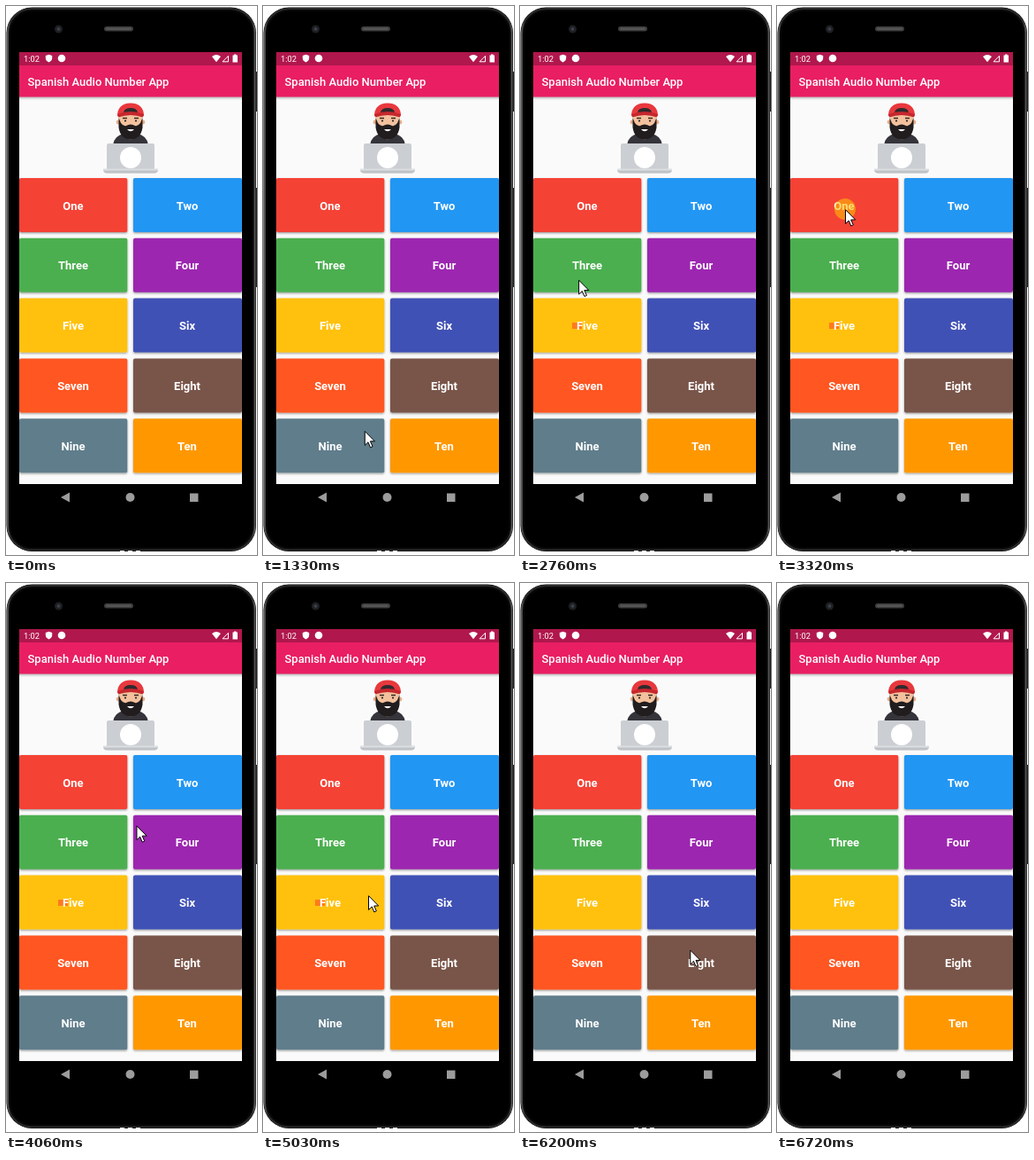
An HTML page that plays this animation: 284 by 619 pixels, repeating every 7.37 s.

```html
<!DOCTYPE html>
<html lang="en">
<head>
<meta charset="utf-8">
<title>Number buttons</title>
<style>
  html, body { margin: 0; width: 100%; height: 100%; overflow: hidden; background: #fff; }
  svg { display: block; width: 284px; height: 619px; font-family: Roboto, sans-serif; }
</style>
</head>
<body>
<svg viewBox="0 0 284 619">
  <defs>
    <linearGradient id="rim" x2="1" y2="0">
      <stop offset="0" stop-color="#555"/><stop offset=".012" stop-color="#2a2a2a"/>
      <stop offset=".988" stop-color="#2a2a2a"/><stop offset="1" stop-color="#555"/>
    </linearGradient>
    <linearGradient id="fall" x2="0" y2="1">
      <stop offset="0" stop-color="#000" stop-opacity=".28"/><stop offset="1" stop-color="#000" stop-opacity="0"/>
    </linearGradient>
    <filter id="lift" x="-5%" y="-10%" width="110%" height="125%">
      <feDropShadow dx="0" dy="1.2" stdDeviation="1" flood-opacity=".4"/>
    </filter>
  </defs>

  <g id="phone">
    <path d="M282 74h2v45h-2zM282 205h2v112h-2z" fill="#222"/>
    <rect x=".5" y="1.5" width="282.5" height="613.5" rx="29" fill="#080808"/>
    <rect x="2" y="3" width="279.5" height="610.5" rx="27.5" fill="none" stroke="url(#rim)" stroke-width="2"/>
    <rect x="5" y="6" width="273.5" height="604.5" rx="25" fill="#000"/>
    <path d="M129 614.5h25" stroke="#ddd" stroke-dasharray="5 4"/>
    <circle cx="59.5" cy="26" r="4.5" fill="#1d1f22"/>
    <circle cx="59.5" cy="26" r="2" fill="#3a3f48"/>
    <rect x="111" y="23" width="33" height="5.5" rx="2.75" fill="#3d3d3d"/>
    <rect x="113" y="24.5" width="29" height="2.5" rx="1.2" fill="#555"/>
  </g>

  <g id="screen">
    <rect x="15" y="52" width="252" height="487" fill="#fafafa"/>
    <rect x="15" y="102" width="252" height="4" fill="url(#fall)"/>
    <rect x="15" y="67" width="252" height="35.5" fill="#e91e63"/>
    <rect x="15" y="52" width="252" height="15" fill="#b0174c"/>
    <text x="20" y="62.7" font-size="9.3" fill="#fff">1:02</text>
    <text x="24.5" y="90" font-size="13" font-weight="500" fill="#fff">Spanish Audio Number App</text>
    <g fill="#fff">
      <path d="M48.5 54.7l3.7 1.4v2.7q0 3-3.7 4.8q-3.7-1.8-3.7-4.8v-2.7z"/>
      <circle cx="63" cy="59" r="4.3"/>
      <path d="M233 57q5-4 10 0l-5 6.2z"/>
      <path d="M256.5 55.5h1.5v-1h2.5v1h1.5v8h-5.500z"/>
    </g>
    <path d="M245 62.8h6.500v-6.500z" fill="none" stroke="#fff"/>
  </g>

  <g id="man">
    <path d="M121 157q1-11 13-13h14q12 2 13 13z" fill="#34343a"/>
    <path d="M135 138h12v10q-6 5-12 0z" fill="#d99d7a"/>
    <circle cx="127" cy="131" r="2.4" fill="#e8b08c"/>
    <circle cx="155" cy="131" r="2.400" fill="#e8b08c"/>
    <path d="M128 122h26v12q-2 10-13 11q-11-1-13-11z" fill="#f3c19d"/>
    <path d="M127.500 126l2.500 6q3 4 6 3q5-3 10 0q3 1 6-3l2.500-6v11q-2 13-13.500 13.500q-11.500-.5-13.500-13.500z" fill="#211c1d"/>
    <path d="M137 139q4 4.500 8 0z" fill="#fff"/>
    <path d="M132 126.500h5M145 126.500h5" stroke="#3a2826" stroke-width="1.300"/>
    <circle cx="135" cy="129.500" r="1.100" fill="#222"/>
    <circle cx="147" cy="129.500" r="1.100" fill="#222"/>
    <path d="M126 124q0-14 15-14.500q15 .5 15 14.500q-15-5-30 0z" fill="#e8383d"/>
    <path d="M133 120q1-5 8-5t8 5z" fill="#302a2e"/>
    <path d="M126 122q15-6 30 0l-1 3.500q-14-5-28 0z" fill="#c5282e"/>
    <path d="M116 155h50q2 0 2 2v27h-54v-27q0-2 2-2z" fill="#cbced2"/>
    <path d="M110 183.500h62v2q-1 3-4 3h-54q-3 0-4-3z" fill="#dcdfe2"/>
    <path d="M110 185.500h62q-1 3-4 3h-54q-3 0-4-3z" fill="#bfc3c7"/>
    <circle cx="141" cy="171" r="12" fill="#fff"/>
  </g>

  <g id="buttons"></g>

  <g fill="#9c9c9c">
    <path d="M62 554l10-5.500v11z"/>
    <circle cx="140.500" cy="554" r="5"/>
    <rect x="208" y="549.500" width="9.500" height="9.500"/>
  </g>

  <circle id="press" r="12" fill="#ffc400" fill-opacity=".55"/>
  <path id="cursor" d="M.5 .7v15.800l3.700-3.500l2.600 6l2.500-1.100l-2.600-5.900h5z" fill="#fff" stroke="#000" stroke-width="1"/>
</svg>

<script>
const LOOP = 7370;
const NS = 'http://www.w3.org/2000/svg';
const BUTTONS = [
  ['One', '#f44336'], ['Two', '#2196f3'], ['Three', '#4caf50'], ['Four', '#9c27b0'],
  ['Five', '#ffc107'], ['Six', '#3f51b5'], ['Seven', '#ff5722'], ['Eight', '#795548'],
  ['Nine', '#607d8b'], ['Ten', '#ff9800']
];
// time, x, y of the pointer tip
const PATH = [
  [900, 290, 618], [1330, 115, 479], [1580, 50, 429.5], [2310, 50, 429.5],
  [2450, 54, 397], [3040, 77, 229], [3790, 77, 229], [4140, 168, 286],
  [4560, 168, 286], [5030, 119, 352], [6035, 119, 352], [6200, 192, 413],
  [6450, 259, 515], [6720, 285, 619]
];
// button, press start, press end, ripple start, x, y
const TAPS = [
  [6, 1870, 2080, 2310, 50, 430], [0, 3320, 3520, 3790, 77, 229],
  [3, 4370, 4580, 4590, 168, 286], [4, 5280, 5480, 5610, 119, 352]
];
const SMUDGE = [2620, 5750];

const byId = id => document.getElementById(id);
function add(parent, tag, attrs, text) {
  const el = document.createElementNS(NS, tag);
  for (const k in attrs) el.setAttribute(k, attrs[k]);
  if (text) el.textContent = text;
  return parent.appendChild(el);
}
const show = (el, on) => el.setAttribute('visibility', on ? 'visible' : 'hidden');

let smudge;
const ripples = {};
BUTTONS.forEach(([label, fill], i) => {
  const x = i % 2 ? 144 : 15, y = 194 + (i >> 1) * 67.8;
  const box = { x, y, width: i % 2 ? 123 : 122.3, height: 61, rx: 1.8 };
  const g = add(byId('buttons'), 'g', {});
  add(g, 'rect', { ...box, fill, filter: 'url(#lift)' });
  add(add(g, 'clipPath', { id: 'clip' + i }), 'rect', box);
  if (TAPS.some(tap => tap[0] === i)) {
    const layer = add(g, 'g', { 'clip-path': `url(#clip${i})` });
    ripples[i] = add(layer, 'circle', { fill: '#fff' });
  }
  if (label === 'Five') smudge = add(g, 'rect', { x: 59, y: 357, width: 11, height: 7, fill: '#ff7a1c' });
  add(g, 'text', {
    x: x + 61, y: y + 35.6, fill: '#fff', 'font-size': 13, 'font-weight': 700, 'text-anchor': 'middle'
  }, label);
});

function tip(t) {
  const i = PATH.findIndex(p => p[0] > t);
  const [t0, x0, y0] = PATH[i - 1], [t1, x1, y1] = PATH[i];
  const k = (t - t0) / (t1 - t0);
  return [x0 + (x1 - x0) * k, y0 + (y1 - y0) * k];
}

function draw(t) {
  const moving = t >= 910 && t < 6715;
  show(byId('cursor'), moving);
  if (moving) byId('cursor').setAttribute('transform', `translate(${tip(t)})`);

  const tap = TAPS.find(([, on, off]) => t >= on && t < off);
  show(byId('press'), tap);
  if (tap) byId('press').setAttribute('transform', `translate(${tap[4]} ${tap[5]})`);

  for (const [i, , , start, x, y] of TAPS) {
    const age = t - start, live = age >= 0 && age < 205;
    show(ripples[i], live);
    if (!live) continue;
    const attrs = { cx: x, cy: y, r: age * .55, 'fill-opacity': .14 * Math.min(1, (205 - age) / 50) };
    for (const k in attrs) ripples[i].setAttribute(k, attrs[k]);
  }
  show(smudge, t >= SMUDGE[0] && t < SMUDGE[1]);
}

function frame() {
  draw(performance.now() % LOOP);
  requestAnimationFrame(frame);
}
frame();
</script>
</body>
</html>
```
